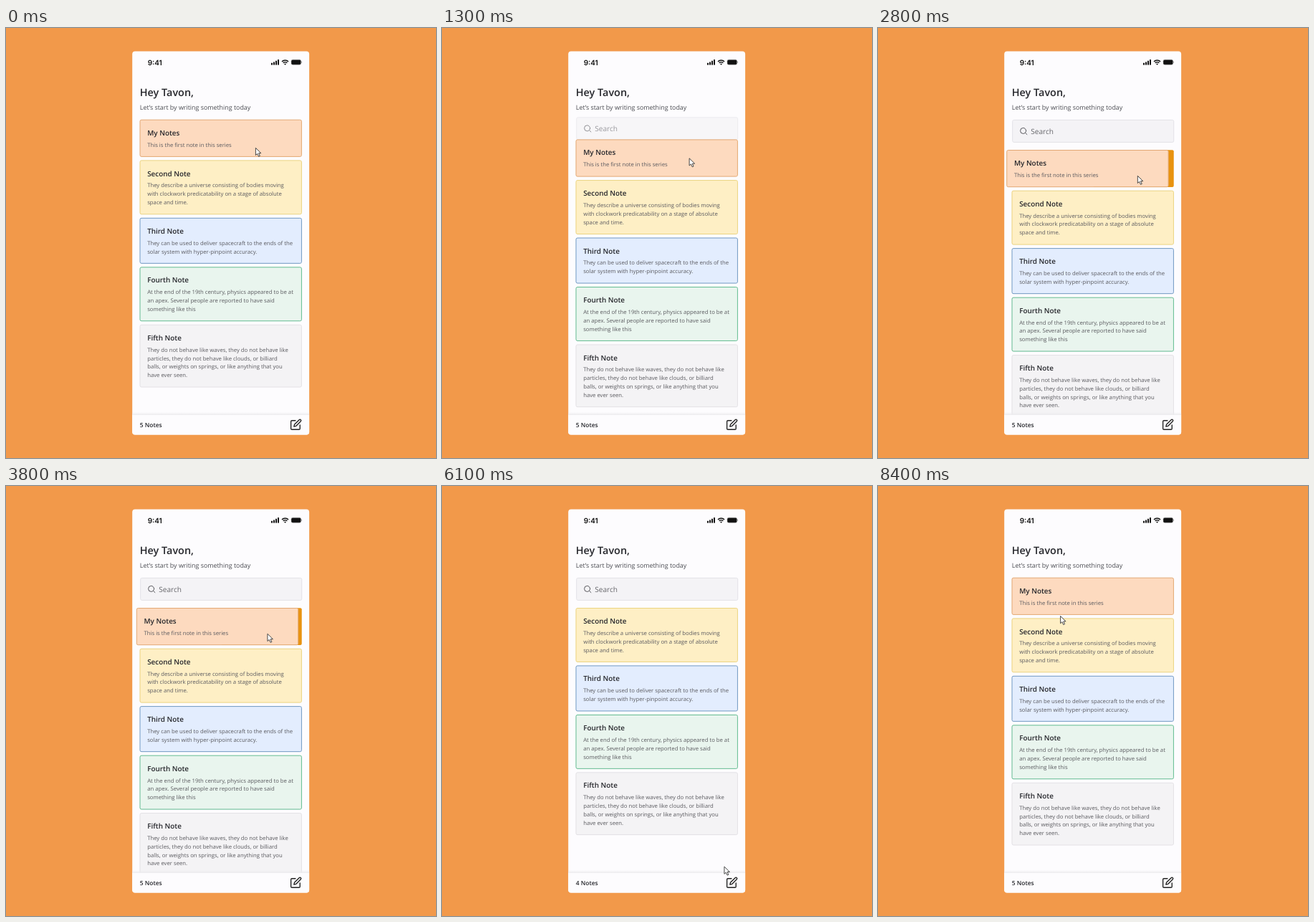
Write an HTML page that moves like this. It is 600 by 600 pixels and loops after 8500 ms.

```html
<!DOCTYPE html>
<html lang="en">
<head>
<meta charset="utf-8">
<title>Notes</title>
<style>
  html, body { margin: 0; width: 100%; height: 100%; overflow: hidden; background: #f2994a; }
  svg { display: block; width: 600px; height: 600px; }
  text { font-family: "Open Sans", "Noto Sans", sans-serif; fill: #25262b; text-rendering: geometricPrecision; }
  .hello { font-size: 14.4px; font-weight: 600; }
  .lead { font-size: 8.9px; fill: #4b4c52; }
  .clock { font: 600 10px Inter, sans-serif; fill: #111; }
  .title { font-size: 9.9px; font-weight: 600; }
  .body { font-size: 7.72px; fill: #5a5a5f; }
  .find { font-size: 10.1px; fill: #66666b; }
  .count { font-size: 8.4px; font-weight: 600; }
  .delete { font-size: 9.1px; font-weight: 600; fill: #fff; }
  .line { fill: none; stroke-linecap: round; stroke-linejoin: round; }
</style>
</head>
<body>
<svg viewBox="0 0 600 600">
  <defs>
    <clipPath id="phone"><rect x="176.2" y="32.5" width="246.9" height="535" rx="4"/></clipPath>
    <linearGradient id="shade" x2="0" y2="1">
      <stop stop-color="#ecebee" stop-opacity="0"/>
      <stop offset="1" stop-color="#ecebee"/>
    </linearGradient>
  </defs>
  <rect width="600" height="600" fill="#f2994a"/>
  <g clip-path="url(#phone)">
    <rect x="176" y="32" width="248" height="536" fill="#fdfcfe"/>

    <text class="clock" x="197.7" y="51.5">9:41</text>
    <path fill="#111" d="M370 48.8h2v2.7h-2zM373 47.4h2v4.1h-2zM376 45.8h2v5.7h-2zM379 44h2v7.5h-2z"/>
    <path fill="none" stroke="#111" stroke-width="1.5" d="M385 46.9a6.5 6.5 0 0 1 9 0M386.7 48.8a4 4 0 0 1 5.6 0"/>
    <path fill="#111" d="M388.1 50.2a2 2 0 0 1 2.8 0l-1.4 1.5z"/>
    <rect x="398" y="44.2" width="13.6" height="7" rx="2" fill="#111" stroke="#aaa" stroke-width=".5"/>
    <path d="M412.4 46.5v2.4" stroke="#999"/>

    <text class="hello" x="186.8" y="94.8">Hey Tavon,</text>
    <text class="lead" x="186.8" y="114">Let’s start by writing something today</text>

    <g id="search">
      <rect x="187.7" y="128.4" width="225" height="31" rx="2" fill="#f4f3f6" stroke="#e3e2e7"/>
      <g class="line" stroke="#55555a"><circle cx="202.6" cy="143.4" r="4"/><path d="M205.6 146.4l2.3 2.2"/></g>
      <text class="find" x="213.3" y="147.7">Search</text>
    </g>

    <g id="under">
      <rect id="pin" x="300" y="128" width="112.7" height="51.8" rx="2" fill="#e8920f"/>
      <g id="trash">
        <rect x="187" y="128" width="225.7" height="51.8" rx="2" fill="#d22c2f"/>
        <text class="delete" x="203" y="157.4">Delete</text>
      </g>
    </g>
    <g id="list"></g>

    <rect x="176" y="536" width="248" height="4" fill="url(#shade)"/>
    <rect x="176" y="540" width="248" height="28" fill="#fdfcfe"/>
    <text class="count" id="count" x="186.8" y="556.7">5 Notes</text>
    <g class="line" stroke="#222" stroke-width="2" transform="translate(396.2 544.9) scale(.7)">
      <path d="M11 4H4a2 2 0 0 0-2 2v14a2 2 0 0 0 2 2h14a2 2 0 0 0 2-2v-7"/>
      <path d="M18.5 2.5a2.12 2.12 0 0 1 3 3L12 15l-4 1 1-4z"/>
    </g>
  </g>
  <path id="cursor" d="M0 0v10.2l2.4-2.1 1.7 3.9 1.8-.8-1.7-3.8h3.3z" fill="#fff" stroke="#333" stroke-width=".9" stroke-linejoin="round"/>
</svg>
<script>
const $ = id => document.getElementById(id);
const LOOP = 8500, OPEN = 42.3, GAP = 56.7, ADDED = 6600;

// title, fill, border, lines
const notes = [
  ["My Notes", "#fddabf", "#e3a873", "This is the first note in this series"],
  ["Second Note", "#feefc5", "#ebd37f", "They describe a universe consisting of bodies moving",
    "with clockwork predicatability on a stage of absolute", "space and time."],
  ["Third Note", "#e3edfe", "#7099c2", "They can be used to deliver spacecraft to the ends of the",
    "solar system with hyper-pinpoint accuracy."],
  ["Fourth Note", "#e9f5ee", "#62bb90", "At the end of the 19th century, physics appeared to be at",
    "an apex. Several people are reported to have said", "something like this"],
  ["Fifth Note", "#f4f3f5", "#e3e1e5", "They do not behave like waves, they do not behave like",
    "particles, they do not behave like clouds, or billiard",
    "balls, or weights on springs, or like anything that you", "have ever seen."]
];

let nextY = 128;
$("list").innerHTML = notes.map(([title, fill, border, ...lines]) => {
  const y = nextY, h = 51.5 + 11.85 * (lines.length - 1);
  const body = lines.map((s, i) => `<text class="body" x="197.2" y="${y + 37.6 + 11.85 * i}">${s}</text>`);
  nextY += h + 5.2;
  return `<g><rect x="187" y="${y + .2}" width="225.4" height="${h - .3}" rx="2" fill="${fill}" stroke="${border}"/>
    <text class="title" x="197.2" y="${y + 21.8}">${title}</text>${body.join("")}</g>`;
}).join("");
const cards = [...$("list").children];

// Pointer moves that drag nothing: from, to, dx, dy
const hops = [
  [0, 500, -3.3, -13.2],
  [1400, 1800, 0, 18.3],
  [1900, 2700, 24.5, -8.4],
  [4100, 4300, -69.5, 0],
  [4700, 5100, -167.8, -13.8],
  [5500, 6200, 183.8, 358.5],
  [6890, 8100, -149.5, -327.2]
];

// Eased ramp from 0 to 1
function ramp(t, from, to) {
  const p = Math.min(1, Math.max(0, (t - from) / (to - from)));
  return p * p * (3 - 2 * p);
}

const move = (el, x, y) => el.setAttribute("transform", `translate(${x.toFixed(2)} ${y.toFixed(2)})`);
const fade = (el, value) => el.setAttribute("opacity", value);

function draw(t) {
  const r = (from, to) => ramp(t, from, to);
  const added = t >= ADDED;

  // A short pull, then a full one that stays open until the end.
  const pull = 37.4 * (r(500, 1000) - r(1100, 1700)) + OPEN * (r(1800, 2470) - r(7500, 8100));

  // Swipe left and back, then right; Delete throws the note out.
  const drag = 70 * (r(3400, 3875) - r(2700, 3200)) + 88 * r(4300, 4700);
  let x = drag + 162 * r(5300, 5600);
  let gap = GAP * r(5500, 5900);
  if (added) {
    x = 250 * Math.exp((ADDED - t) / 117);
    gap = GAP * Math.exp((ADDED - t) / 110);
  }

  cards.forEach((card, i) => move(card, i ? 0 : x, i ? pull - gap : pull));
  move($("under"), 0, pull);
  fade($("pin"), x < -.01 ? 1 : 0);
  fade($("trash"), x > .01 && !added ? 1 - r(5500, 5800) : 0);
  move($("search"), 0, (pull - OPEN) * .245);
  fade($("search"), pull / OPEN);
  $("count").textContent = (t >= 5600 && !added ? 4 : 5) + " Notes";

  let cx = 348.4 + drag, cy = 167.3 + pull;
  for (const [from, to, dx, dy] of hops) {
    cx += dx * r(from, to);
    cy += dy * r(from, to);
  }
  move($("cursor"), cx, cy);
}

const start = performance.now();
function tick() {
  const t = (performance.now() - start) % LOOP;
  draw(Math.floor(t / 100) * 100); // ten poses a second
  requestAnimationFrame(tick);
}
tick();
</script>
</body>
</html>
```
